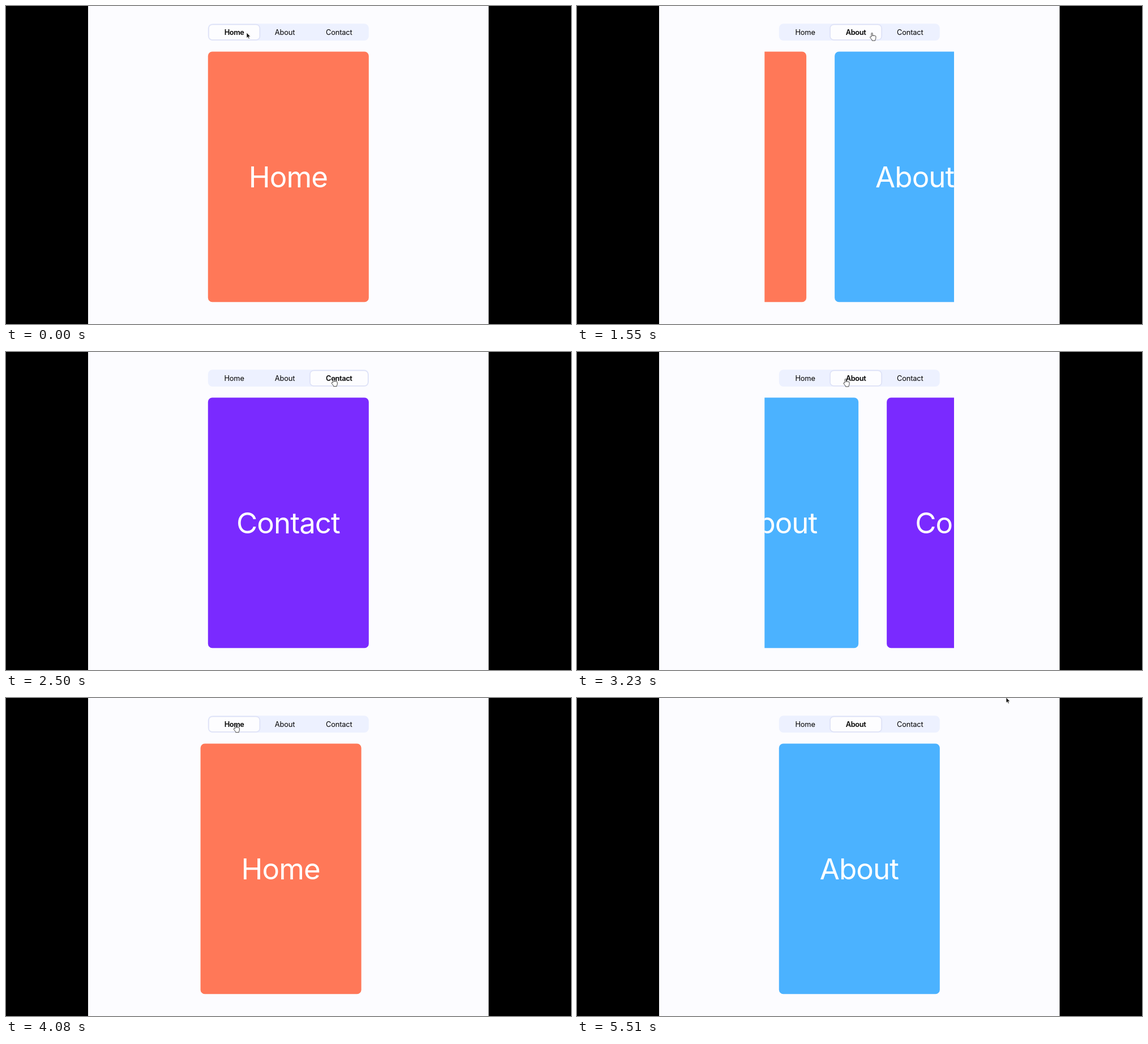
Write an HTML page that moves like this. It is 998x561 px and loops after 5.59 s.

```html
<!DOCTYPE html>
<html lang="en">
<head>
<meta charset="utf-8">
<title>Tabs</title>
<style>
  html, body { margin: 0; width: 100%; height: 100%; overflow: hidden; background: #000; }
  svg { display: block; width: 100vw; height: 100vh; }
  text { font-family: Inter, "Liberation Sans", sans-serif; font-optical-sizing: none; text-anchor: middle; }
  .tab { font-size: 12.8px; letter-spacing: -.01em; }
  .tab.active { font-weight: 600; letter-spacing: -.03em; }
  .title { font-size: 51px; letter-spacing: -.018em; fill: #fff; }
  #pill { fill: #fdfdff; filter: drop-shadow(0 .5px 1.3px rgba(70, 80, 170, .38)); }
</style>
</head>
<body>
<svg viewBox="0 0 998 561">
  <defs>
    <clipPath id="view"><rect x="331.3" y="70" width="334.7" height="470"/></clipPath>
  </defs>
  <rect x="145" width="707.5" height="561" fill="#fcfcff"/>
  <rect x="356.8" y="31.2" width="284" height="29.8" rx="8" fill="#edf1ff"/>
  <rect id="pill" y="33.2" height="26" rx="6"/>
  <g id="tabs"></g>
  <g clip-path="url(#view)"><g id="cards"></g></g>
  <g id="cursor">
    <path id="arrow" d="M0 0V9.6L2.2 7.6 3.7 11 5.3 10.3 3.8 7H6.8Z" fill="#111" stroke="#fff" stroke-width=".7"/>
    <path id="hand" fill="#fff" stroke="#333" stroke-width=".9" stroke-linejoin="round"
      d="M-1 6.5V.7a1 1 0 0 1 2.1 0V5a1 1 0 0 1 2-.1 1 1 0 0 1 2 .3 1 1 0 0 1 1.8 .6V8.5q0 2-1.2 3.6V13.2H.2V12.2L-3.2 7.8q-.5-1.4 .7-1.5z"/>
  </g>
</svg>
<script>
const LOOP = 5590, DURATION = 300, PITCH = 334, TABS_LEFT = 358.5;

const pages = [
  { name: 'Home', color: '#ff7858', width: 89.2 },
  { name: 'About', color: '#4bb2ff', width: 89.8 },
  { name: 'Contact', color: '#7a2aff', width: 101.5 },
];
pages.forEach((page, i) => {
  page.left = i ? pages[i - 1].left + pages[i - 1].width : TABS_LEFT;
});

// tab: when the pill jumps, start: when the cards begin to slide
const clicks = [
  { tab: 0, start: -DURATION, page: 0 },
  { tab: 1400, start: 1426, page: 1 },
  { tab: 2240, start: 2200, page: 2 },
  { tab: 3110, start: 3132, page: 1 },
  { tab: 3930, start: 3856, page: 0 },
  { tab: 4880, start: 4900, page: 1 },
];

// Each move eases the pointer tip from wherever it rests
const moves = [
  { start: 770, x: 496, y: 48 },
  { start: 1490, x: 578.5, y: 47.5 },
  { start: 2500, x: 504, y: 48 },
  { start: 3170, x: 405.5, y: 47.5 },
  { start: 4085, x: 497, y: 43.5 },
  { start: 5190, x: 758, y: -1 },
];

const $ = id => document.getElementById(id);
const mix = (a, b, k) => a + (b - a) * k;

$('tabs').innerHTML = pages.map(p =>
  `<text class="tab" x="${p.left + p.width / 2}" y="51.4">${p.name}</text>`).join('');
$('cards').innerHTML = pages.map((p, i) => `<g transform="translate(${i * PITCH})">
  <rect x="356.8" y="80.6" width="284" height="441.6" rx="7.5" fill="${p.color}"/>
  <text class="title" x="498.4" y="320.3">${p.name}</text></g>`).join('');

// The CSS "ease" curve, cubic-bezier(.25, .1, .25, 1)
function ease(x) {
  if (x <= 0) return 0;
  if (x >= 1) return 1;
  let low = 0, high = 1;
  for (let i = 0; i < 24; i++) {
    const s = (low + high) / 2;
    if (.75 * s * (1 - s) + s ** 3 < x) low = s; else high = s;
  }
  return .3 * low * (1 - low) ** 2 + 3 * low * low * (1 - low) + low ** 3;
}

const progress = (t, start) => ease((t - start) / DURATION);

function draw(t) {
  const current = clicks.findLastIndex(click => click.tab <= t);
  const { page, start } = clicks[current];
  const previous = clicks[Math.max(0, current - 1)].page;
  const scroll = mix(previous, page, progress(t, start)) * PITCH;
  $('cards').setAttribute('transform', `translate(${-scroll})`);

  $('pill').setAttribute('x', pages[page].left);
  $('pill').setAttribute('width', pages[page].width);
  [...$('tabs').children].forEach((tab, i) => tab.classList.toggle('active', i === page));

  let x = 425, y = 47;
  for (const move of moves) {
    const k = progress(t, move.start);
    x = mix(x, move.x, k);
    y = mix(y, move.y, k);
  }
  const overTab = t > moves[0].start && x < 641 && y > 31;
  $('cursor').setAttribute('transform', `translate(${x} ${y})`);
  $('hand').style.display = overTab ? '' : 'none';
  $('arrow').style.display = overTab ? 'none' : '';
}

const startTime = performance.now();
function frame() {
  draw((performance.now() - startTime) % LOOP);
  requestAnimationFrame(frame);
}
frame();
</script>
</body>
</html>
```
